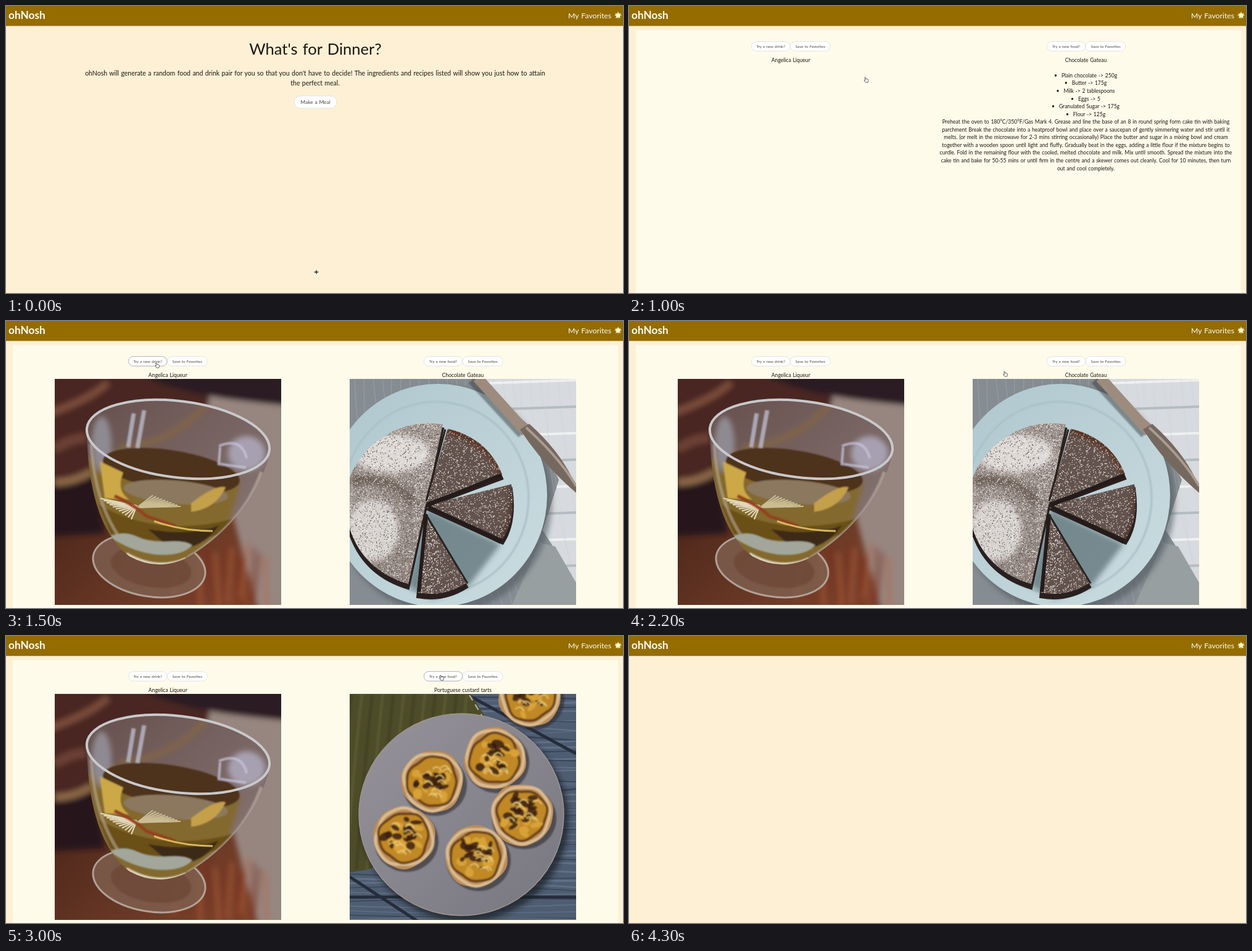
Recreate the animation shown at these times as an HTML page. Size 1000 by 466 pixels, loop 4.4 s.

```html
<!DOCTYPE html>
<html lang="en">
<head>
<meta charset="utf-8">
<title>What's for Dinner?</title>
<style>
  html, body { margin: 0; width: 100%; height: 100%; overflow: hidden; background: #fdf0d5; }
  #stage { display: block; width: 100vw; height: 100vh; }
  text { font: 8.54px Lato, "Open Sans", sans-serif; word-spacing: .07em; fill: #1b1710; }
  .mid { text-anchor: middle; }
  .header { fill: #fffdf3; }
  .logo { font-weight: 700; }
  .button rect { fill: #fff; stroke: #dcdcde; stroke-width: .8; }
  .button text { fill: #4b463c; }
  .ring { fill: none; stroke: #adadb3; stroke-width: .8; }
  .soft { filter: url(#soft); }
  .blur { filter: url(#blur); }
</style>
</head>
<body>
<svg id="stage" viewBox="0 0 1000 466" preserveAspectRatio="none"></svg>
<script>
const LOOP = 4400, STEP = 100;

let seed = 41;
const random = (min, max) => {
  seed = seed * 16807 % 2147483647;
  return min + (max - min) * seed / 2147483647;
};
const repeat = (count, draw) => Array.from({ length: count }, (_, i) => draw(i)).join('');

// "on" holds start/end pairs in ms.
const during = (on, content) => `<g data-on="${on}">${content}</g>`;
const text = (x, y, words, size = 8.54, kind = 'mid') =>
  `<text x="${x}" y="${y}" class="${kind}" style="font-size:${size}px">${words}</text>`;
const shape = (d, fill, extra = '') => `<path d="${d}" fill="${fill}" ${extra}/>`;
const line = (d, color, width, extra = '') =>
  `<path d="${d}" fill="none" stroke="${color}" stroke-width="${width}" ${extra}/>`;
const oval = (x, y, rx, ry, fill, extra = '') =>
  `<ellipse cx="${x}" cy="${y}" rx="${rx}" ry="${ry}" fill="${fill}" ${extra}/>`;
const tilt = (x, y, angle) => `transform="rotate(${angle} ${x} ${y})"`;
const button = (x, y, w, h, label, size) => `<g class="button">
  <rect x="${x}" y="${y}" width="${w}" height="${h}" rx="${h / 2}"/>
  ${text(x + w / 2, y + h / 2 + size * .34, label, size)}</g>`;
const ring = (x, y, w, h) => `<rect class="ring" x="${x}" y="${y}" width="${w}" height="${h}" rx="${h / 2}"/>`;
const pair = (x, gap, kind) =>
  button(x, 57.6, 62.5, 15.6, `Try a new ${kind}?`, 6.35) + button(x + 62.5 + gap, 57.6, 65, 15.6, 'Save to Favorites', 6.35);
const photo = (id, x, content) =>
  `<svg id="${id}" x="${x}" y="94" width="367" height="367"><g transform="translate(${-x} -94)">${content}</g></svg>`;
const recipe = (ingredients, steps) => {
  const row = i => 115.9 + i * 12.55;
  return ingredients.map((item, i) => text(740, row(i), '•\u2002 ' + item)).join('') +
    steps.map((step, i) => text(740.5, row(i + ingredients.length), step)).join('');
};

const star = (x, y, points, outer, inner, fill) => {
  const corners = Array.from({ length: points * 2 }, (_, i) => {
    const angle = i * Math.PI / points - Math.PI / 2, r = i % 2 ? inner : outer;
    return `${x + r * Math.cos(angle)},${y + r * Math.sin(angle)}`;
  });
  return `<polygon points="${corners.join(' ')}" fill="${fill}"/>`;
};

const drinkPhoto = `
  <rect x="79" y="94" width="367" height="367" fill="url(#wood)"/>
  <g class="blur">
    ${shape('M322 118 L460 135 V475 H412 C385 390 350 250 322 118Z', '#97857f')}
    ${shape('M60 80 H322 L330 130 L290 190 L140 250 L60 270Z', '#492720')}
    ${shape('M205 80 H460 V138 C390 130 270 122 205 80Z', '#2c1c20')}
    ${shape('M60 258 L145 250 L160 345 L60 350Z', '#25151a')}
    ${line('M70 150 Q140 125 165 100', '#7a4c3b', 12)}
    ${line('M79 208 Q105 190 130 190', '#6c4034', 16)}
    ${line('M79 262 Q110 262 140 244', '#8a6647', 13)}
    ${repeat(16, i => line(`M${285 + i * 9} ${360 + i % 4 * 8} l${random(-14, 8)} 90`, i % 3 ? '#7e2f1c' : '#b5623b', 5, 'opacity=".6"'))}
  </g>
  ${oval(232, 397, 92, 50, '#806150', 'opacity=".8" stroke="#c3bcb4" stroke-width="3" ' + tilt(232, 397, 10))}
  ${oval(235, 400, 66, 32, '#6b4330', 'opacity=".6" class="soft" ' + tilt(235, 400, 10))}
  ${shape('M131 176 C132 255 146 340 200 382 Q245 407 292 385 C355 350 415 280 428 210 A149 62 7 0 0 131 176Z', 'url(#glass)')}
  <g clip-path="url(#bowl)">
    <g class="blur">
      ${shape('M130 225 Q150 215 180 210 L380 262 L362 325 L292 400 H195 Q145 350 130 225Z', '#83692d')}
      ${line('M185 205 Q270 200 328 132', '#80634a', 11)}
      ${oval(155, 200, 16, 45, '#8f8a92')}${oval(390, 215, 30, 28, '#a7a0b0')}
    </g>
    <g class="soft">
      ${oval(268, 243, 112, 33, '#4d321f', tilt(268, 243, 9))}
      ${oval(275, 278, 85, 19, '#8b785f', tilt(275, 278, 5))}
      ${shape('M152 228 L190 246 Q178 275 200 290 L160 288Z', '#cca846')}
      ${shape('M300 296 Q340 265 356 270 Q340 305 300 310Z', '#c5a04b')}
      ${shape('M150 298 Q250 355 372 320 L352 345 Q270 370 170 345Z', '#6b5015')}
      ${shape('M230 338 Q300 350 345 332 Q320 370 270 372Z', '#3c2b12')}
      ${line('M224 145 L213 206 M207 150 L198 205', '#c3c9dc', 7, 'opacity=".7"')}
      ${line('M345 203 Q382 188 390 223 M347 205 L345 232 L389 238', '#c8c6de', 4, 'opacity=".75"')}
      ${line('M138 200 Q144 300 190 360', '#b9ab98', 5, 'opacity=".6"')}
      ${line('M414 245 Q385 330 294 385', '#b7aaa0', 6, 'opacity=".7"')}
      ${shape('M168 350 Q190 340 212 350 T262 358 T302 364 Q285 383 240 379 Q200 373 168 350Z', '#a3a79b')}
      ${line('M195 378 Q245 407 292 386', '#ddd3bd', 5)}
    </g>
  </g>
  ${repeat(11, i => line(`M212 300 L${153 + i * 5} ${288 + i * 3.4}`, '#e2d8bb', 2.2))}
  ${repeat(10, i => line(`M212 303 L${238 + i * 5} ${283 + i * 2}`, '#cbbd94', 2.2))}
  ${line('M176 284 Q210 300 228 317 L275 333', '#94401f', 5, 'class="soft"')}
  ${line('M240 325 Q285 341 335 341', '#d7b95f', 3)}
  ${oval(279, 192, 149, 62, 'none', 'stroke="#c9c9cb" stroke-width="4" ' + tilt(279, 192, 7))}`;

const dots = (count, color, size, x0, x1) => {
  const d = repeat(count, () => `M${random(x0, x1).toFixed(1)} ${random(164, 448).toFixed(1)}h${size}`);
  return line(d, color, size);
};
const cakeTop = 'M680 299 L708 168 A138 138 0 0 0 548 295 Q560 400 652 427Z';
const slices = 'M681 295 L716 175 Q780 190 804 249Z M684 299 L819 265 Q827 320 805 354Z M681 313 L747 425 Q710 449 667 441Z';
const cakePhoto = `
  <rect x="557" y="94" width="367" height="367" fill="#d7dade"/>
  ${repeat(9, i => line(`M780 ${101 + i * 43} L924 ${96 + i * 43}`, i % 2 ? '#b4bcc1' : '#eff0f1', 4))}
  ${shape('M557 94 H760 L860 180 L896 258 L870 340 L924 425 V461 H557Z', '#868d92')}
  ${repeat(24, i => line(`M${565 + i * 15} 94 q${random(-15, 30)} 180 60 367`, '#c4c9ca', 1, 'opacity=".3"'))}
  ${shape('M865 360 L890 366 L924 425 V461 H820Z', '#989fa1')}
  ${oval(708, 291, 177, 185, '#50595e', 'opacity=".6" class="blur"')}
  ${oval(700, 283, 177, 181, 'url(#plate)')}
  ${oval(697, 287, 150, 156, 'none', 'stroke="#a9c1c8" stroke-width="3" class="soft"')}
  ${line('M757 94 L838 182', '#2f3336', 20, 'opacity=".45" class="soft"')}
  ${line('M764 92 L843 180', '#9d8b7e', 17)}
  ${shape('M833 176 L848 167 Q908 220 930 284 Q872 236 833 176Z', '#75685f')}
  ${line('M843 173 Q898 223 924 268', '#a99b8f', 4)}
  <g class="blur">${shape('M650 430 L683 305 L802 362 L750 430 L690 452Z', '#4d6166', 'opacity=".65"')}</g>
  <g transform="translate(0 7)">${shape(cakeTop + slices, '#29201f', 'stroke="#29201f" stroke-width="4"')}</g>
  ${shape(cakeTop, 'url(#sugar)')}${shape(slices, '#63534d')}
  <g clip-path="url(#cake)">
    <g class="haze">
      ${oval(625, 215, 62, 32, '#dcd8d5')}${oval(595, 340, 42, 50, '#d6d2cf')}
      ${line('M715 176 Q785 192 807 250', '#5a3223', 14)}
      ${line('M821 267 Q827 325 802 359', '#4b3229', 10)}
      ${line('M560 260 Q630 250 665 300', '#75675f', 16)}
    </g>
    ${dots(2200, '#4c3e39', 1.1, 557, 700)}${dots(2600, '#f4f1ee', 1.2, 557, 700)}${dots(3200, '#e9e5e2', 1.2, 660, 823)}
  </g>
  ${line('M684 299 L803 250 M685 302 L802 359 M681 314 L669 440', '#241b1a', 6)}
  ${line('M681 292 L712 176 M680 313 L748 426', '#2b2220', 3)}`;

const wobble = (x, y, r, amount) => {
  const phase = random(0, 6);
  const corners = Array.from({ length: 48 }, (_, i) => {
    const a = i * Math.PI / 24, d = r + amount * (Math.sin(3 * a + phase) + Math.sin(7 * a - phase) / 2);
    return `${(x + d * Math.cos(a)).toFixed(1)} ${(y + d * Math.sin(a)).toFixed(1)}`;
  });
  return `M${corners.join('L')}Z`;
};
const tart = ([x, y]) => `
  ${oval(x + 4, y + 6, 52, 50, '#2f2a2e', 'opacity=".6" class="soft"')}
  ${shape(wobble(x, y, 50, 1.5), '#b88a58')}
  <g class="soft">
    ${line(wobble(x, y, 46, 1.5), '#dcbd91', 5)}
    ${shape(wobble(x, y, 40, 2), '#c08928', 'stroke="#6b4019" stroke-width="4"')}
    ${repeat(14, () => oval(x + random(-26, 26), y + random(-25, 25), random(4, 11), random(3, 9), '#d8a237', tilt(x, y, random(0, 360))))}
    ${repeat(16, () => oval(x + random(-28, 20), y + random(-28, 18), random(3, 11), random(2, 7), '#3a1f10', 'opacity=".85" ' + tilt(x, y, random(-40, 40))))}
    ${repeat(10, () => line(`M${x + random(-26, 18)} ${y + random(-24, 26)} q8 -8 14 3`, '#efce7c', 1.6))}
  </g>`;
const tartPhoto = `
  <rect x="557" y="94" width="367" height="367" fill="#4f5d72"/>
  ${repeat(50, i => line(`M557 ${98 + i * 7.4} q${random(120, 240)} ${random(-12, 12)} 367 ${random(-7, 7)}`, i % 3 ? '#6f7d94' : '#2b3546', random(1, 3), 'opacity=".6"'))}
  ${line('M745 94 L924 191 M557 391 L670 465 M557 424 H924', '#252d3b', 5)}
  ${shape('M557 94 H753 L776 130 L610 250 L594 378 L557 384Z', '#4c4c29')}
  ${repeat(12, i => line(`M${560 + i * 17} 94 q-12 100 -26 285`, i % 2 ? '#6d6c3d' : '#35351b', 5, 'opacity=".35" class="soft"'))}
  ${line('M751 96 L773 132', '#b9b8a1', 2, 'stroke-dasharray="10 8"')}
  ${oval(744, 299, 168, 165, '#191c24', 'opacity=".7" class="blur"')}
  ${oval(738, 290, 166, 164, 'url(#slate)', 'stroke="#a0938e" stroke-width="1.5"')}
  ${[[849, 97], [691, 236], [792, 199], [836, 290], [762, 358], [645, 327]].map(tart).join('')}`;

const gateau = recipe(
  ['Plain chocolate -&gt; 250g', 'Butter -&gt; 175g', 'Milk -&gt; 2 tablespoons', 'Eggs -&gt; 5', 'Granulated Sugar -&gt; 175g', 'Flour -&gt; 125g'],
  ['Preheat the oven to 180°C/350°F/Gas Mark 4. Grease and line the base of an 8 in round spring form cake tin with baking',
   'parchment Break the chocolate into a heatproof bowl and place over a saucepan of gently simmering water and stir until it',
   'melts. (or melt in the microwave for 2-3 mins stirring occasionally) Place the butter and sugar in a mixing bowl and cream',
   'together with a wooden spoon until light and fluffy. Gradually beat in the eggs, adding a little flour if the mixture begins to',
   'curdle. Fold in the remaining flour with the cooled, melted chocolate and milk. Mix until smooth. Spread the mixture into the',
   'cake tin and bake for 50-55 mins or until firm in the centre and a skewer comes out cleanly. Cool for 10 minutes, then turn',
   'out and cool completely.']);
const tarts = recipe(
  ['Plain Flour -&gt; 35g', 'Icing Sugar -&gt; 1 tbs', 'Puff Pastry -&gt; 375g', 'Caster Sugar -&gt; 250g', 'Egg Yolks -&gt; 7', 'Milk -&gt; 500ml'],
  ['Mix the flour and icing sugar, and use this to dust the work surface. Roll the pastry out to make a large rectangle. Roll up',
   'lengthways to create a long sausage. Cut the pastry into wheels and press each one into the hole of a muffin tin. Chill',
   'while you make the custard. Heat the sugar with a little water until syrupy, then stir in the milk and the flour. Add the egg',
   'yolks and whisk over a low heat until thick. Spoon the custard into the pastry cases and bake until golden and puffed, with',
   'dark patches on top. Leave to cool in the tin.']);

const gradient = (id, from, to) =>
  `<linearGradient id="${id}" x2="1" y2="1"><stop stop-color="${from}"/><stop offset="1" stop-color="${to}"/></linearGradient>`;
const stage = document.getElementById('stage');
stage.innerHTML = `
  <defs>
    ${gradient('wood', '#351913', '#85492f')}${gradient('glass', '#66504d', '#8a7a78')}
    ${gradient('plate', '#adc6cd', '#cbdde1')}${gradient('sugar', '#a79d98', '#8a7e78')}${gradient('slate', '#96929a', '#77777f')}
    <filter id="soft"><feGaussianBlur stdDeviation="1.2"/></filter>
    <filter id="blur"><feGaussianBlur stdDeviation="4"/></filter>
    <clipPath id="cake"><path d="${cakeTop + slices}"/></clipPath>
    <clipPath id="bowl"><path d="M131 176 C132 255 146 340 200 382 Q245 407 292 385 C355 350 415 280 428 210 A149 62 7 0 0 131 176Z"/></clipPath>
  </defs>
  <rect width="1000" height="466" fill="#fdf0d5"/>
  <rect width="1000" height="32.4" fill="#946c00"/>
  ${text(4, 21, 'ohNosh', 17.3, 'header logo')}
  ${text(911, 20, 'My Favorites', 12.3, 'header')}
  ${star(992, 15.3, 8, 6.5, 3, '#e5c96f')}${star(992, 15.3, 5, 5.5, 2.8, '#fff8d2')}
  ${during('0 700',
    text(501.5, 79, "What's for Dinner?", 25.5) +
    text(501, 112.7, "ohNosh will generate a random food and drink pair for you so that you don't have to decide! The ingredients and recipes listed will show you just how to attain", 10.5) +
    text(501, 128.5, 'the perfect meal.', 10.5) +
    button(467, 146, 69, 20, 'Make a Meal', 8.46))}
  ${during('600 700', ring(467, 146, 69, 20))}
  ${during('700 1000', '<rect x="11" y="39.5" width="981" height="61" fill="#fffbeb"/>' + pair(197.3, 2, 'drink') + pair(676, 2, 'food'))}
  ${during('1000 4100', '<rect x="11" y="39.5" width="981" height="427" fill="#fffbeb"/>' + pair(198.5, .3, 'drink') + text(262.3, 90.8, 'Angelica Liqueur'))}
  ${during('1200 4100', photo('drink', 79, drinkPhoto))}
  ${during('1400 2000', ring(198.5, 57.6, 62.5, 15.6))}
  ${during('1000 2500 2800 4100', pair(677.3, .3, 'food'))}
  ${during('1000 2500', text(740.5, 90.8, 'Chocolate Gateau'))}
  ${during('1000 1400', gateau)}
  ${during('1400 2500', photo('cakes', 557, cakePhoto))}
  ${during('2800 4100', text(740.5, 90.8, 'Portuguese custard tarts'))}
  ${during('2800 3000', tarts)}
  ${during('3000 4100', photo('tarts', 557, tartPhoto))}
  ${during('2400 2500 2800 3500', ring(677.3, 57.6, 62.5, 15.6))}
  ${during('3500 3800', ring(740.1, 57.6, 65, 15.6))}
  <g id="cursor">
    ${during('0 500', line('M-3.5 0H3.5M0 -3.5V3.5', '#fff', 3) + line('M-3.3 0H3.3M0 -3.3V3.3', '#222', 1.3))}
    ${during('500 4300', shape('M-2.4 -4 Q-1.6 -4.8 -.9 -3.8 L-.4 -1.6 L2.6 -1.2 Q3.8 -.8 3.5 1 L2.7 4 H-1 L-3.5 .8 Q-3.3 -.2 -2.2 .5 L-1.6 .9Z', '#fff', 'stroke="#555" stroke-width=".9"'))}
  </g>`;
stage.querySelector('.haze').classList.add('blur');

// time, x, y
const route = [
  [0, 503, 432], [200, 512, 395], [400, 536, 230], [600, 501, 155], [800, 501, 155],
  [1200, 268, 85], [1500, 245, 72], [1900, 245, 72], [2100, 450, 88], [2300, 770, 84], [2400, 706, 68],
  [3300, 706, 68], [3500, 770, 68], [3700, 770, 68], [4000, 951, 16], [LOOP, 951, 16]
];
const cursorAt = t => {
  const i = route.findIndex(point => point[0] > t);
  const [t0, x0, y0] = route[i - 1], [t1, x1, y1] = route[i];
  const p = (t - t0) / (t1 - t0), eased = p * p * (3 - 2 * p);
  return [x0 + (x1 - x0) * eased, y0 + (y1 - y0) * eased];
};

const timed = [...stage.querySelectorAll('[data-on]')].map(el => [el, el.dataset.on.split(' ').map(Number)]);
const cursor = document.getElementById('cursor'), drink = document.getElementById('drink');

function render(now) {
  const t = Math.floor(now % LOOP / STEP) * STEP;
  for (const [el, times] of timed) {
    const visible = times.filter(time => time <= t).length % 2;
    el.style.display = visible ? '' : 'none';
  }
  drink.setAttribute('height', t < 1300 ? 16 : 367);
  cursor.setAttribute('transform', `translate(${cursorAt(t)})`);
  requestAnimationFrame(render);
}
render(0);
</script>
</body>
</html>
```
